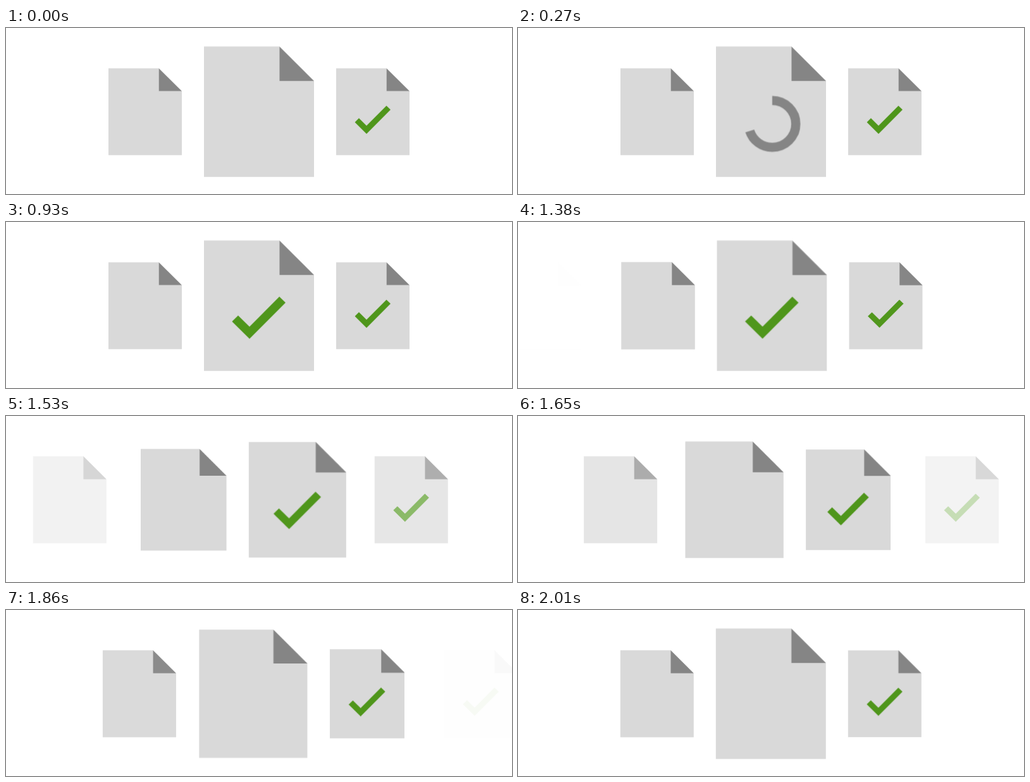
Animation, 800 px wide and 264 px high, one loop 2040 ms. Source, as an HTML page:

```html
<!DOCTYPE html>
<html lang="en">
<head>
<meta charset="utf-8">
<title>Document queue</title>
<style>
  html, body { margin: 0; width: 100%; height: 100%; overflow: hidden; background: #fff; }
  svg { display: block; width: 800px; height: 264px; }

  .slot, .ring, .tick { animation: 2040ms linear infinite; }

  .slot {
    --from: 1; --to: 1; --fade-from: 1; --fade-to: 1;
    animation-name: slide;
  }
  .entering { --x: 40px;  --from: .6667; --to: .6667; --fade-from: 0; }
  .waiting  { --x: 220px; --from: .6667; }
  .active   { --x: 400px; --to: .6667; }
  .leaving  { --x: 580px; --from: .6667; --to: .6667; --fade-to: 0; }

  .ring {
    fill: none; stroke: #858585; stroke-width: 14.5;
    stroke-dasharray: 1 2;
    animation-name: sweep, fade-out;
  }
  .tick { animation-name: fade-in; }

  /* Documents move one place to the right from 1350 ms on */
  @keyframes slide {
    0%, 66.176% {
      transform: translate(var(--x), 133.2px) scale(var(--from));
      opacity: var(--fade-from);
      animation-timing-function: cubic-bezier(.295, 0, .268, 1);
    }
    100% {
      transform: translate(calc(var(--x) + 180px), 133.2px) scale(var(--to));
      opacity: var(--fade-to);
    }
  }
  @keyframes sweep {
    0% { stroke-dashoffset: 1; animation-timing-function: cubic-bezier(.295, 0, .268, 1); }
    29.412%, 100% { stroke-dashoffset: 0; }
  }
  @keyframes fade-out {
    0%, 35.294% { opacity: 1; }
    45.588%, 100% { opacity: 0; }
  }
  @keyframes fade-in {
    0%, 35.294% { opacity: 0; }
    45.588%, 100% { opacity: 1; }
  }
</style>
</head>
<body>
<svg viewBox="0 0 800 264">
  <defs>
    <g id="doc">
      <path fill="#d9d9d9" d="M-87-103.7H32.4V-49.1H87V103.7H-87Z"/>
      <path fill="#858585" d="M32.4-103.7L87-49.1H32.4Z"/>
    </g>
    <path id="check" fill="#4f961b" d="M-42.7 25L-33 15.4L-15 33.2L32.2-14.5L42-4.9L-15 52.6Z"/>
  </defs>

  <g class="slot entering"><use href="#doc"/></g>
  <g class="slot waiting"><use href="#doc"/></g>
  <g class="slot active">
    <use href="#doc"/>
    <circle class="ring" cx="2" cy="19.3" r="37.25" pathLength="1" transform="rotate(-90 2 19.3)"/>
    <use class="tick" href="#check"/>
  </g>
  <g class="slot leaving"><use href="#doc"/><use href="#check"/></g>
</svg>
</body>
</html>
```
